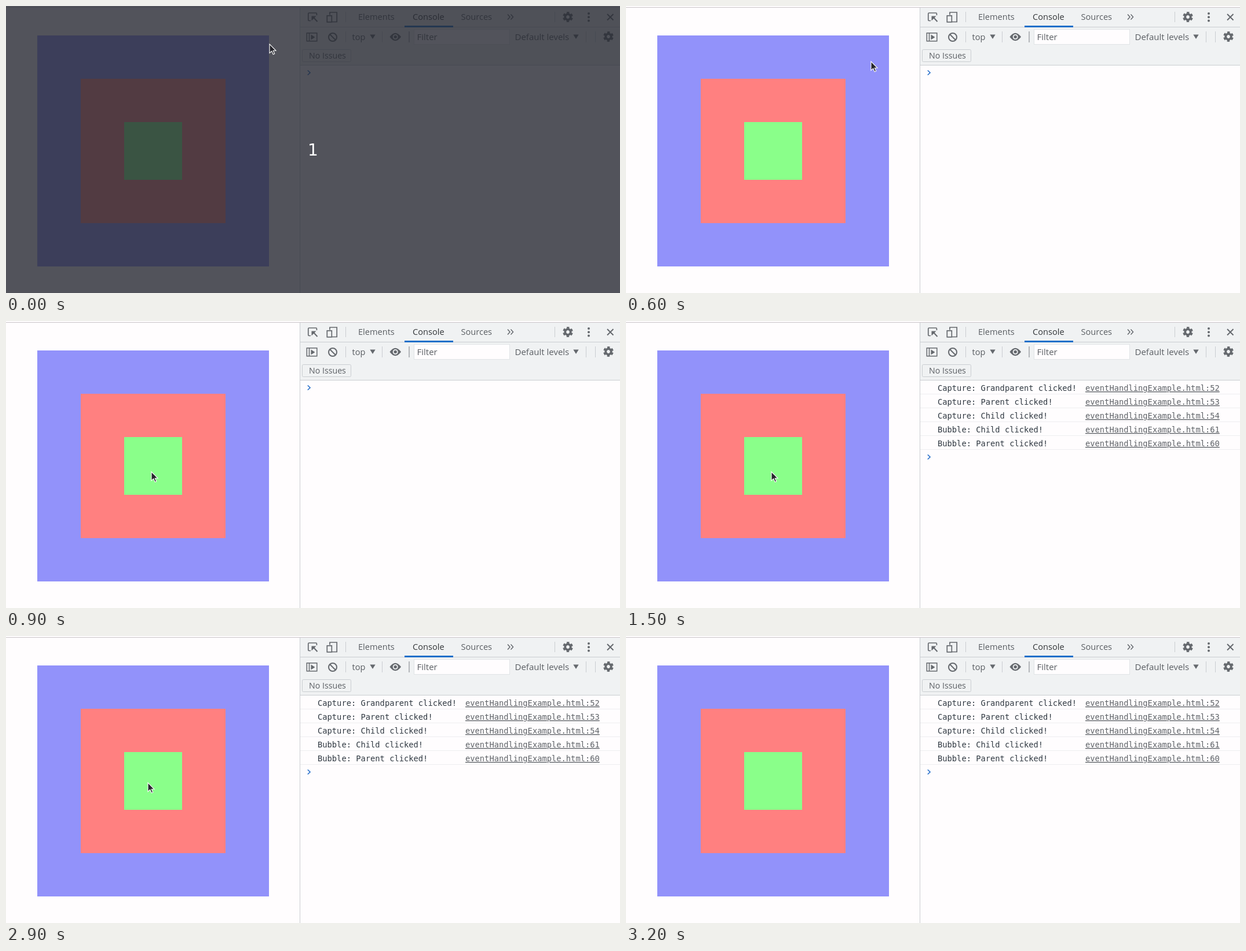
Animation, 1060 px wide and 497 px high, one loop 4000 ms. Source, as an HTML page:

```html
<!DOCTYPE html>
<html lang="en">
<head>
<meta charset="utf-8">
<title>Event phases</title>
<style>
  html, body { margin: 0; width: 100%; height: 100%; overflow: hidden; background: #fffdfe; }
  svg { display: block; width: 100vw; height: 100vh; }
  text { white-space: pre; }
  .ui { font: 14.6px "Open Sans", "Noto Sans", sans-serif; fill: #5a5e63; }
  .log { font: 13.75px "DejaVu Sans Mono", monospace; fill: #303942; }
  .link { fill: #5f6368; text-decoration: underline; }
  .icon { fill: none; stroke: #65696e; stroke-width: 1.7; }
  .solid { fill: #65696e; }
  .rule { fill: none; stroke: #cacdd1; }
</style>
</head>
<body>
<svg viewBox="0 0 1060 497">
  <defs>
    <g id="gear" class="icon">
      <circle r="4.8" stroke-width="3.8"/>
      <circle r="7.4" stroke-width="3" stroke-dasharray="4.3 3.449" stroke-dashoffset="-1.72"/>
    </g>
    <path id="drop" class="solid" d="M-4.7 -3.5H4.7L0 4Z"/>
  </defs>

  <rect width="1060" height="497" fill="#fffdfe"/>
  <path d="M0 2.5H1060" stroke="#c9c3c7"/>
  <rect x="54" y="51" width="400" height="400" fill="#9292fa"/>
  <rect x="129" y="126" width="250" height="250" fill="#ff8080"/>
  <rect x="204" y="201" width="100" height="100" fill="#8aff8a"/>

  <rect x="508" y="3" width="552" height="99" fill="#f0f2f3"/>
  <path class="rule" d="M507.5 3V497M508 36.5H1060M508 102.5H1060M586.5 10V28M947.5 10V28M586.5 44V63M649.5 44V63M1001.5 44V63M1017.5 44V63"/>
  <path d="M696 44V63" stroke="#b3b6ba" stroke-width="2"/>
  <rect x="688" y="34" width="84" height="3" fill="#1a6fc9"/>
  <rect x="704.5" y="40.5" width="165" height="26" fill="#fffdfe" stroke="#e1e4e6"/>
  <rect class="rule" x="511.5" y="75.5" width="84" height="21" rx="2"/>

  <g class="icon">
    <path d="M526 25.5H523.2Q521.8 25.5 521.8 24V13.5Q521.8 12 523.2 12H535Q536.4 12 536.4 13.5V16"/>
    <path d="M531 20L537.5 27" stroke-width="2"/>
    <path d="M559 15.5V11H571.2V27.5H563"/>
    <rect x="554.3" y="16.8" width="8" height="11"/>
    <path d="M866 14.5L870 19L866 23.5M871.5 14.5L875.5 19L871.5 23.5" stroke-width="1.5"/>
    <path d="M1038 14L1048.500 24.500M1048.500 14L1038 24.500" stroke-width="2"/>
    <rect x="519.3" y="46.800" width="17.500" height="14" stroke-width="1.500"/>
    <path d="M523.500 47V61" stroke-width="1.500"/>
    <circle cx="564" cy="54" r="7" stroke-width="2"/>
    <path d="M559 49L569 59" stroke-width="2"/>
  </g>
  <g class="solid">
    <path d="M527.500 17.500H535.500L527.500 25.500Z"/>
    <path d="M526.500 49.500V58.500L533.500 54Z"/>
    <circle cx="1006" cy="13" r="2"/>
    <circle cx="1006" cy="19.300" r="2"/>
    <circle cx="1006" cy="25.600" r="2"/>
    <path d="M662.500 53.500Q672 40 682 53.500Q672 67 662.500 53.500Z"/>
  </g>
  <circle cx="672.200" cy="53.500" r="3.600" fill="#65696e" stroke="#f0f2f3" stroke-width="1.800"/>
  <use href="#gear" x="970" y="19"/>
  <use href="#gear" x="1040" y="53"/>
  <use href="#drop" x="633" y="53"/>
  <use href="#drop" x="984" y="53"/>

  <g class="ui">
    <text x="608" y="24">Elements</text>
    <text x="702" y="24" fill="#333639">Console</text>
    <text x="785.500" y="24">Sources</text>
    <text x="597.500" y="59">top</text>
    <text x="709.500" y="59" font-size="15">Filter</text>
    <text x="878.500" y="59" style="font-size:15px">Default levels</text>
    <text x="523" y="91" style="font-size:14.200px">No Issues</text>
  </g>

  <g id="logs"></g>
  <path id="prompt" d="M520.800 111.500L525 115.500L520.800 119.500" fill="none" stroke="#2c72cb" stroke-width="1.700"/>

  <g id="cover">
    <rect width="1060" height="497" fill="#272a32" opacity=".8"/>
    <text x="521" y="259" font-family="DejaVu Sans, sans-serif" font-size="28" fill="#fff">1</text>
  </g>
  <path id="cursor" d="M0 0V15.500L3.700 12.200L6.200 17.800L8.700 16.700L6.300 11.300H11Z" fill="#25252b" stroke="#fff" stroke-width="1.100"/>
</svg>
<script>
const LOOP = 4000, STEP = 100, ROW = 24;
const $ = id => document.getElementById(id);
const logs = $("logs"), prompt = $("prompt"), cover = $("cover"), cursor = $("cursor");

const lines = [
  ["Capture: Grandparent", 52],
  ["Capture: Parent", 53],
  ["Capture: Child", 54],
  ["Bubble: Child", 61],
  ["Bubble: Parent", 60]
];
logs.innerHTML = lines.map(([who, line], i) => `
  <g class="log" transform="translate(0 ${i * ROW})">
    <text x="538" y="121">${who} clicked!</text>
    <text class="link" x="793" y="121">eventHandlingExample.html:${line}</text>
    <path d="M508 126.5H1060" stroke="#eeeef0"/>
  </g>`).join("");
const rows = [...logs.children];

const start = [455, 66], target = [251, 261], exit = [79, 50];
const mix = (a, b, p) => a.map((v, i) => Math.round(v + (b[i] - v) * p));
const smooth = p => p * p * (3 - 2 * p);
const show = (el, on) => el.setAttribute("visibility", on ? "visible" : "hidden");

function cursorAt(t) {
  if (t < 2900) {
    const p = Math.min(1, Math.max(0, (t - 500) / 400));
    return mix(start, target, smooth(p));
  }
  return mix(target, exit, Math.min(1, (t - 2800) / 300) ** 3.1);
}

function draw(now) {
  const t = Math.floor((now % LOOP) / STEP) * STEP;
  const count = t < 1400 ? 0 : t < 1500 ? 4 : 5;
  show(cover, t < 100);
  rows.forEach((row, i) => show(row, i < count));
  prompt.setAttribute("transform", `translate(0 ${count * ROW})`);
  show(cursor, t < 3200);
  cursor.setAttribute("transform", `translate(${cursorAt(t)})`);
}

const began = performance.now();
function tick() {
  draw(performance.now() - began);
  requestAnimationFrame(tick);
}
tick();
</script>
</body>
</html>
```
